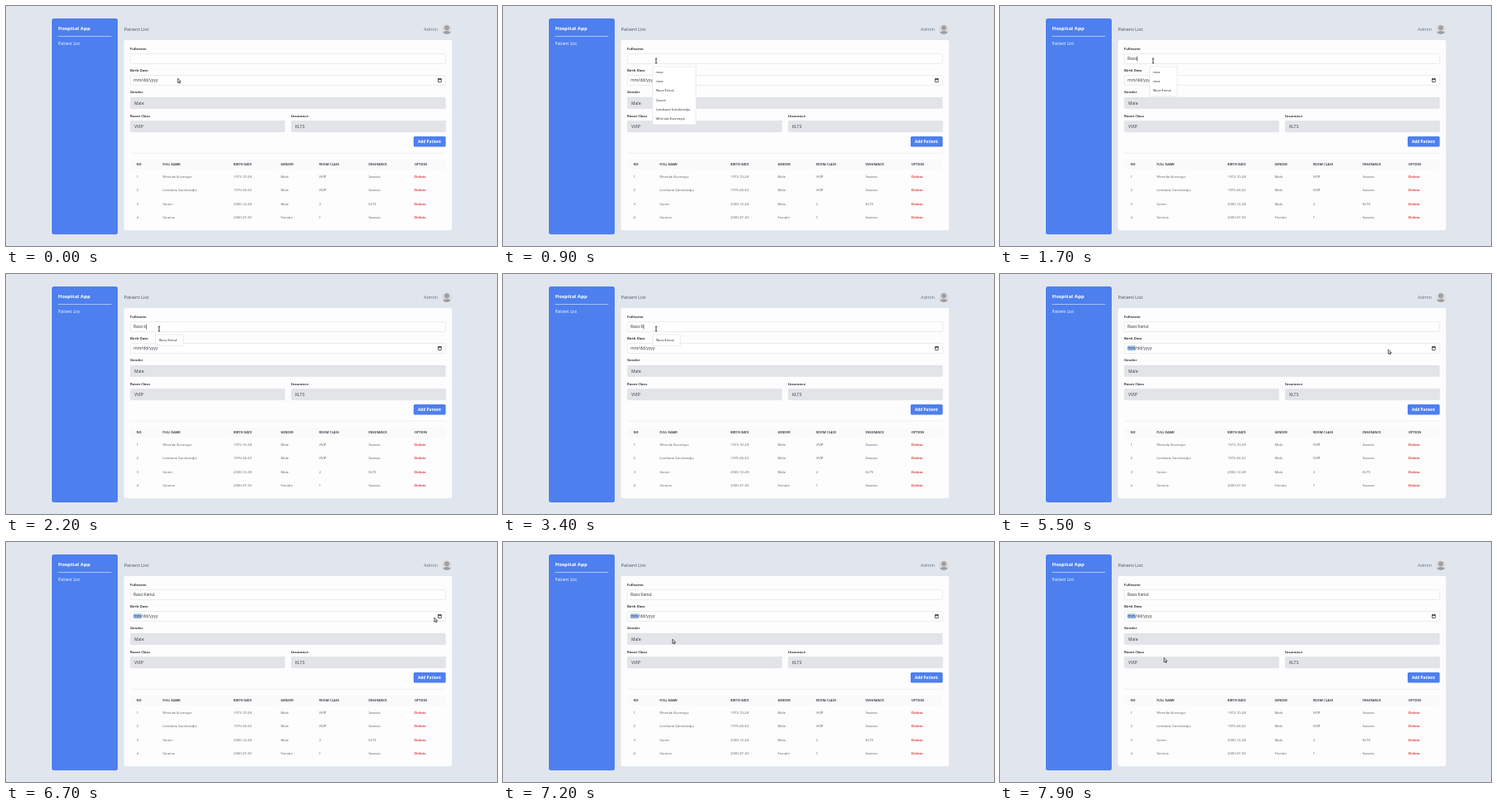
Animation of 589x289 px, one loop 8000 ms. Source, as an HTML page:

```html
<!DOCTYPE html>
<html lang="en">
<head>
<meta charset="utf-8">
<title>Hospital App</title>
<style>
  html, body { margin: 0; width: 100%; height: 100%; overflow: hidden; background: #e1e6ee; }
  svg { display: block; width: 100%; height: 100%; }
  text { font-family: "Noto Sans", "Open Sans", sans-serif; white-space: pre; }
  .field { fill: #fff; stroke: #e1e4e9; stroke-width: .7; }
  .select { fill: #e2e4e8; stroke: #dadde2; stroke-width: .4; }
  .brand { fill: #4d7fee; }
</style>
</head>
<body>
<svg viewBox="0 0 589 289">
  <rect class="brand" x="55" y="15" width="79" height="260" rx="2.5"/>
  <rect x="62.5" y="36" width="64" height=".8" fill="#c3d3fa"/>
  <rect x="141.5" y="41" width="393.5" height="229" rx="2.5" fill="#fdfdfd"/>

  <clipPath id="face"><circle cx="528.8" cy="28" r="6"/></clipPath>
  <g clip-path="url(#face)">
    <rect x="522" y="21" width="14" height="14" fill="#dcdbdb"/>
    <circle cx="528.8" cy="26.2" r="3" fill="#a19f9f"/>
    <ellipse cx="528.8" cy="34" rx="5.6" ry="3.9" fill="#a19f9f"/>
  </g>

  <rect class="field" x="149.3" y="57.7" width="378" height="11.8" rx="1"/>
  <rect class="field" x="149.3" y="83.6" width="378" height="11.8" rx="1"/>
  <rect class="select" x="149.2" y="110" width="378" height="13.5" rx="1"/>
  <rect class="select" x="149.2" y="138.2" width="185.2" height="13.5" rx="1"/>
  <rect class="select" x="342.2" y="138.2" width="185.2" height="13.5" rx="1"/>
  <rect class="brand" x="489" y="157" width="38.5" height="12.5" rx="1.5"/>
  <rect x="149" y="176.8" width="378.5" height=".6" fill="#e3e6ea"/>
  <rect x="149" y="185" width="378.5" height="12" fill="#fafafb"/>

  <g id="calendar">
    <rect x="518.4" y="87.7" width="3.8" height="3.9" rx=".3" fill="none" stroke="#222" stroke-width=".7"/>
    <path d="M518.2 88.2h4.2M519.2 87v1M521.4 87v1" stroke="#222" stroke-width=".9"/>
  </g>
  <rect id="highlight" x="153" y="86.3" width="9.6" height="6" fill="#9dc3ee"/>
  <g id="labels"></g>
  <text id="typed" x="153" y="65.4" font-size="4.9" fill="#30353d"></text>
  <rect id="caret" y="60.6" width=".6" height="5.8" fill="#222"/>
  <g id="menu">
    <rect id="menuBox" x="179.7" y="73" fill="#fff" stroke="#dfe1e5" stroke-width=".6"/>
    <g id="menuItems"></g>
  </g>
  <path id="arrow" d="M0 0V5.2L1.3 4.1 2.1 5.9 3 5.5 2.2 3.8 3.8 3.7Z"
        fill="#eee" stroke="#222" stroke-width=".7" stroke-linejoin="round"/>
  <path id="beam" d="M-1.2-2.8h2.4M0-2.8V2.8M-1.2 2.8h2.4" fill="none" stroke="#222" stroke-width=".8"/>
</svg>
<script>
const LOOP = 8000, TICK = 100;
const $ = id => document.getElementById(id);

function addText(parent, x, y, content, size, fill, weight = 400) {
  const node = document.createElementNS("http://www.w3.org/2000/svg", "text");
  const attrs = { x, y, fill, "font-size": size, "font-weight": weight };
  for (const key in attrs) node.setAttribute(key, attrs[key]);
  node.textContent = content;
  parent.append(node);
}
const label = (...args) => addText($("labels"), ...args);

label(62.5, 28.9, "Hospital App", 6.05, "#fff", 700);
label(62.5, 47, "Patient List", 5, "#f4f7ff");
label(141.4, 30.1, "Patient List", 5.75, "#4f5763");
label(501, 30.1, "Admin", 5.55, "#707782");
label(494, 165.1, "Add Patient", 4.75, "#fff", 700);

[[149, 53.4, "Fullname"], [149, 79.2, "Birth Date"], [149, 105.3, "Gender"],
 [149, 133.5, "Room Class"], [342, 133.5, "Insurance"]]
  .forEach(([x, y, name]) => label(x, y, name, 4.2, "#30353d", 700));

[[153, 91.3, "mm/dd/yyyy"], [154, 118.6, "Male"], [154, 146.8, "VVIP"], [347, 146.8, "KLTS"]]
  .forEach(([x, y, value]) => label(x, y, value, 5, "#3c424b"));

const columns = [156.5, 188, 273, 329.5, 375.4, 435, 490];
["NO", "FULL NAME", "BIRTH DATE", "GENDER", "ROOM CLASS", "INSURANCE", "OPTION"]
  .forEach((name, i) => label(columns[i], 192.3, name, 3.75, "#3f454f", 700));
[["1", "Wrenda Kusmoyo", "1973-10-28", "Male", "VVIP", "Swasta"],
 ["2", "Lembara Sutokiradjo", "1976-04-02", "Male", "VVIP", "Swasta"],
 ["3", "Gemir", "2000-12-28", "Male", "2", "KLTS"],
 ["4", "Gemira", "2000-07-30", "Female", "1", "Swasta"]]
  .forEach((row, r) => {
    const y = 207 + r * 16.25;
    row.forEach((cell, i) => label(columns[i], y, cell, 4.2, "#636a75"));
    label(columns[6], y, "Delete", 4.25, "#d93a3a", 700);
  });

const typing = [[0, ""], [1200, "R"], [1500, "Ra"], [1600, "Ras"], [1700, "Raso"], [1900, "Raso "],
  [2200, "Raso k"], [2800, "Raso "], [3400, "Raso K"], [3500, "Raso Ke"], [3600, "Raso Ken"],
  [3800, "Raso Kenu"], [3900, "Raso Kenul"]];

const known = ["raso", "rasa", "Raso Kenul", "Gemir", "Lembara Sutokiradjo", "Wrenda Kusmoyo"];
const menus = [[0, []], [500, known], [1200, known.slice(0, 3)],
  [1800, ["raso", "Raso Kenul"]], [2000, ["Raso Kenul"]], [4000, []]];

const carets = [[0, false], [300, true], [900, false], [1200, true], [4100, false]];

// time, x, y of the pointer tip
const pointer = [[0, 206, 87.3], [100, 202, 83], [200, 190, 72], [300, 183.7, 66], [4300, 183.7, 66],
  [4400, 183.5, 70], [4500, 184.5, 82], [4600, 185.3, 91], [4800, 189, 92], [5000, 176, 91],
  [5200, 160.5, 89.5], [5300, 250, 91], [5400, 370, 91.5], [5500, 465.8, 91], [5600, 525, 92],
  [5700, 538, 92], [5900, 518, 90], [6000, 518, 90], [6200, 513.8, 91], [6700, 513.8, 91],
  [7000, 205, 110], [7100, 205, 110], [7600, 196.5, 145], [7700, 196.5, 145], [7900, 196.8, 139.5], [8000, 196.8, 139.5]];

const at = (steps, t) => steps.findLast(step => step[0] <= t)[1];

function pointerAt(t) {
  const i = pointer.findLastIndex(p => p[0] <= t);
  const [t0, x0, y0] = pointer[i], [t1, x1, y1] = pointer[i + 1];
  const k = (t - t0) / (t1 - t0);
  return [x0 + (x1 - x0) * k, y0 + (y1 - y0) * k];
}

const show = (node, visible) => node.setAttribute("visibility", visible ? "visible" : "hidden");

let shownMenu;
function drawMenu(items) {
  if (items === shownMenu) return;
  shownMenu = items;
  $("menu").style.display = items.length ? "" : "none";
  $("menuBox").setAttribute("width", items.length > 3 ? 52 : 33);
  $("menuBox").setAttribute("height", items.length * 11.3 + 2);
  $("menuItems").replaceChildren();
  items.forEach((item, i) => addText($("menuItems"), 183.5, 80.6 + i * 11.3, item, 4.2, "#30353d"));
}

function draw() {
  const t = Math.floor(performance.now() % LOOP / TICK) * TICK;
  const typed = $("typed");
  typed.textContent = at(typing, t);
  $("caret").setAttribute("x", 153.2 + typed.getComputedTextLength());
  show($("caret"), at(carets, t));
  drawMenu(at(menus, t));
  show($("highlight"), t >= 5200);

  const overText = t >= 300 && t < 4500;
  const place = `translate(${pointerAt(t)})`;
  for (const id of ["arrow", "beam"]) {
    $(id).setAttribute("transform", place);
    show($(id), (id === "beam") === overText);
  }
  requestAnimationFrame(draw);
}
draw();
</script>
</body>
</html>
```
